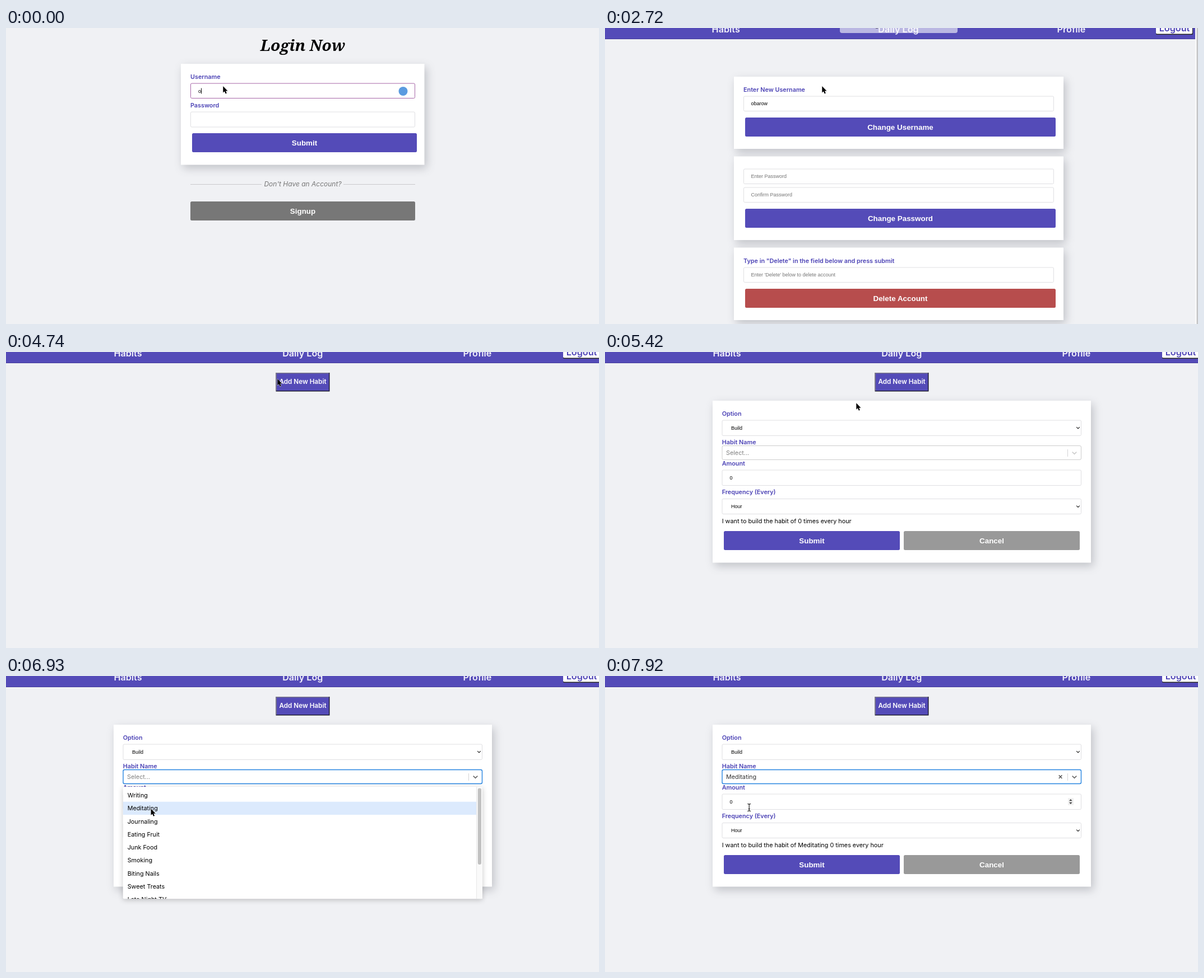
Recreate the animation shown at these times as an HTML page. Size 1058 by 529 pixels, loop 8000 ms.

```html
<!DOCTYPE html>
<html lang="en">
<head>
<meta charset="utf-8">
<title>Habit tracker demo</title>
<style>
html, body { margin: 0; width: 100%; height: 100%; overflow: hidden; background: #f0f1f4; }
svg { display: block; width: 1058px; height: 529px; }
text { font-family: Inter, "Noto Sans", sans-serif; font-size: 10.8px; white-space: pre; }
.title { font: italic 700 28px "Noto Serif", serif; }
.label { font-weight: 600; fill: #4b42b5; }
.nav { font-weight: 600; font-size: 16.2px; fill: #f4f3fb; }
.logout { font-weight: 600; font-size: 16.2px; fill: #4b42b5; }
.add { font-weight: 600; font-size: 11.7px; fill: #fff; }
.ask { font-style: italic; font-size: 12px; fill: #777; }
.input { font-family: "Liberation Sans", Arial, sans-serif; font-size: 9px; }
.hint { fill: #757575; }
.btn { font: 700 13.4px "Liberation Sans", Arial, sans-serif; fill: #fff; }
.grey { fill: #808080; }
.mid { text-anchor: middle; }
.card { filter: drop-shadow(4px 6px 8px rgba(40, 45, 60, .24)); }
.menu { filter: drop-shadow(0 2px 5px rgba(0, 0, 0, .22)); }
</style>
</head>
<body>
<svg id="stage" viewBox="0 0 1058 529"></svg>
<script>
const NS = 'http://www.w3.org/2000/svg';
const stage = document.getElementById('stage');
const PURPLE = '#544bb8', LINE = '#dfdfe2', PINK = '#a766a8', BLUE = '#2684e0';
const USER = 'obarow', LOOP = 8000;

function add(parent, tag, attrs, content) {
  const el = document.createElementNS(NS, tag);
  for (const k in attrs) el.setAttribute(k, attrs[k]);
  if (content !== undefined) el.textContent = content;
  parent.appendChild(el);
  return el;
}
const group = (p, attrs = {}) => add(p, 'g', attrs);
const box = (p, x, y, r, b, fill, more = {}) =>
  add(p, 'rect', { x, y, width: r - x, height: b - y, fill, ...more });
const line = (p, d, stroke, width = 1, more = {}) =>
  add(p, 'path', { d, stroke, 'stroke-width': width, fill: 'none', ...more });
const text = (p, x, y, cls, s) => add(p, 'text', { x, y, class: cls }, s);
const field = (p, x, y, r, b) =>
  box(p, x + .5, y + .5, r - .5, b - .5, '#fff', { stroke: LINE, rx: 2 });
const card = (p, x, y, r, b) => box(p, x, y, r, b, '#fff', { class: 'card' });
const show = (el, on) => el.setAttribute('visibility', on ? 'inherit' : 'hidden');

function button(p, x, y, r, b, fill, s) {
  const el = box(p, x, y, r, b, fill, { rx: 2.5 });
  text(p, (x + r) / 2, (y + b) / 2 + 4.7, 'btn mid', s);
  return el;
}

function navBar(p, right, habits, log, profile, out) {
  box(p, 0, 0, right, 20, PURPLE);
  box(p, 0, 19, right, 20, '#453d9c');
  text(p, habits, 7.6, 'nav mid', 'Habits');
  text(p, log, 7.6, 'nav mid', 'Daily Log');
  text(p, profile, 7.6, 'nav mid', 'Profile');
  box(p, out, -12, out + 66, 12, '#222', { rx: 2 });
  box(p, out, -12, out + 65, 10.6, '#fff', { rx: 2 });
  text(p, out + 33, 5.8, 'logout mid', 'Logout');
}

function dropArrow(p, x, y, colour, size, width) {
  return line(p, `M${x - size} ${y - size / 2}l${size} ${size}l${size} ${-size}`, colour, width);
}

// Login
const login = group(stage);
text(login, 529.5, 40.5, 'title mid', 'Login Now');
card(login, 312, 64, 746.5, 244.5);
text(login, 329, 91, 'label', 'Username');
const userField = field(login, 329, 98.5, 730, 126);
text(login, 329, 142, 'label', 'Password');
const passField = field(login, 329, 149.5, 730, 177.5);
const userText = text(login, 343, 115.5, 'input', '');
const passText = text(login, 343, 166.5, 'input', '');
const caret = box(login, 0, 0, 1, 10, '#111');
const badge = add(login, 'circle', { cx: 708.5, r: 8, fill: '#5b9be0' });
const submit = button(login, 332, 188, 733, 222, PURPLE, 'Submit');
line(login, 'M329 279.5H456M602 279.5H730', '#c9c9cc');
text(login, 529.5, 283.3, 'ask mid', "Don't Have an Account?");
button(login, 329, 310, 730, 344, '#777', 'Signup');

// Profile
const profile = group(stage);
navBar(profile, 1053, 215.7, 523.5, 832, 983);
const toast = group(profile);
box(toast, 419, -12, 629, 9, '#fff', { rx: 4, opacity: .6 });
add(toast, 'ellipse', { cx: 485, cy: -1, rx: 3, ry: 1.8, fill: '#333' });
box(profile, 1053, 0, 1058, 529, '#fafafa');
box(profile, 1055.5, 0, 1058, 529, '#c4c4c6');
card(profile, 230, 87, 818, 216);
text(profile, 247, 114, 'label', 'Enter New Username');
field(profile, 247, 121.5, 801, 149);
text(profile, 260.5, 138, 'input', USER);
button(profile, 250, 160, 804, 194, PURPLE, 'Change Username');
card(profile, 230, 229.5, 818, 379);
field(profile, 247, 251.5, 801, 279);
text(profile, 260.5, 268.3, 'input hint', 'Enter Password');
field(profile, 247, 284.5, 801, 312);
text(profile, 260.5, 301.3, 'input hint', 'Confirm Password');
button(profile, 250, 323, 804, 357, PURPLE, 'Change Password');
card(profile, 230, 392.5, 818, 522);
text(profile, 247, 419.7, 'label', 'Type in "Delete" in the field below and press submit');
field(profile, 247, 427.5, 801, 455);
text(profile, 260.5, 444.2, 'input hint', "Enter 'Delete' below to delete account");
button(profile, 250, 466, 804, 500, '#b74d4d', 'Delete Account');

// Habits
const habits = group(stage);
navBar(habits, 1058, 217.5, 529.3, 841, 994);
box(habits, 481.5, 37, 577.5, 70.5, '#1d1b33');
box(habits, 481.5, 37, 576, 69, '#77758c');
box(habits, 483, 38.5, 576, 69, PURPLE);
text(habits, 529.5, 57.2, 'add mid', 'Add New Habit');

const form = group(habits);
card(form, 192, 87, 867, 376.5);
text(form, 208.7, 114, 'label', 'Option');
field(form, 208.5, 121.5, 850, 150);
text(form, 225, 138.5, 'input', 'Build');
dropArrow(form, 844, 135.5, '#222', 2.8, 1.2);
text(form, 208.7, 165, 'label', 'Habit Name');
const picker = box(form, 209, 167.5, 849.5, 192.5, '#fff', { rx: 2.5 });
const picked = text(form, 216, 184.4, '', '');
line(form, 'M825.5 174V187', '#d4d4d6');
const pickArrow = dropArrow(form, 837.5, 180.5, '#ccc', 3.8, 1.5);
const clear = line(form, 'M809.8 177.3l5.6 5.8M815.4 177.3l-5.6 5.8', '#555', 1.5);
text(form, 208.7, 203.4, 'label', 'Amount');
field(form, 208.5, 210.5, 850, 239);
text(form, 222.5, 227.7, 'input', '0');
const spinner = group(form);
box(spinner, 826, 218, 836, 231, '#f1f1f1');
add(spinner, 'path', { d: 'M828 223.3l2.8-3.2l2.8 3.2zM828 225.7l2.8 3.2l2.8-3.2z', fill: '#444' });
text(form, 208.7, 254.4, 'label', 'Frequency (Every)');
field(form, 208.5, 262, 850, 290);
text(form, 225, 279, 'input', 'Hour');
dropArrow(form, 844, 276, '#222', 2.8, 1.2);
const summary = text(form, 208.7, 306, '', '');
button(form, 212, 320, 526, 354, PURPLE, 'Submit');
button(form, 533, 320, 847, 354, '#999', 'Cancel');

// Option list
const ROW = 23.3, TOP = 201.4;
const menu = group(form);
box(menu, 208.7, 198, 850, 398.3, '#fff', { rx: 2.5, class: 'menu' });
const clip = add(menu, 'clipPath', { id: 'list' });
box(clip, 208.7, 198, 850, 398.3, '#000');
const list = group(menu, { 'clip-path': 'url(#list)' });
const mark = box(list, 208.7, 0, 839, ROW, '#dceafd');
['Writing', 'Meditating', 'Journaling', 'Eating Fruit', 'Junk Food', 'Smoking',
  'Biting Nails', 'Sweet Treats', 'Late Night TV'].forEach((name, i) =>
  text(list, 216.7, TOP + ROW * (i + .5) + 3.9, '', name));
box(list, 839, 198, 850, 398.3, '#fafafa');
line(list, 'M839.5 198V398', '#e8e8e8');
box(list, 841.8, 200.5, 848, 337, '#c1c1c1', { rx: 3 });

// Pointers
const arrow = add(stage, 'path', {
  d: 'M0 0V11.6L2.6 9.2L4.5 13.5L6.5 12.6L4.7 8.5H8.2Z',
  fill: '#000', stroke: '#fff', 'stroke-width': 1, 'paint-order': 'stroke'
});
const beam = line(stage, 'M-3 -6.5Q0 -6.5 0 -5V5Q0 6.5 -3 6.5M3 -6.5Q0 -6.5 0 -5M0 5Q0 6.5 3 6.5M-1.5 2.5H1.5',
  '#222', 1.2, { transform: 'translate(257.2 235)' });

// Pointer moves: first step, last step, number of steps, end point
const MOVES = [
  [3350, 4070, 10, 241, 11], [4420, 4740, 5, 484.3, 48], [4820, 4980, 3, 518, 62],
  [5240, 5920, 10, 346, 134], [6000, 6180, 3, 264.2, 187], [6350, 6440, 2, 264.2, 185.3],
  [6680, 7090, 6, 257, 252], [7170, 7250, 2, 257, 246], [7340, 7340, 1, 257, 238]
];
const TYPED = [0, 80, 230, 310, 390, 470];
const DOTS = [1520, 1670, 1670, 1850, 1940];
const count = (times, t) => times.filter(s => s <= t).length;

function pointer(t) {
  let x = 387.3, y = 104;
  for (const [from, to, n, ex, ey] of MOVES) {
    if (t < from) break;
    const step = to > from ? Math.min(n, Math.floor((t - from) / (to - from) * (n - 1) + 1e-6) + 1) : n;
    const p = step / n, e = p * (2 - p) * .5 + p * .5;
    x += (ex - x) * e;
    y += (ey - y) * e;
  }
  return [x, y];
}

function drawLogin(t) {
  const inUser = t < 830, inPass = !inUser && t < 2120;
  userText.textContent = USER.slice(0, count(TYPED, t));
  passText.textContent = '•'.repeat(count(DOTS, t));
  userField.setAttribute('stroke', inUser ? PINK : LINE);
  passField.setAttribute('stroke', inPass ? PINK : LINE);
  submit.setAttribute('stroke', inUser || inPass ? 'none' : PINK);
  show(badge, inUser || inPass);
  badge.setAttribute('cy', inUser ? 113 : 164);
  show(caret, inUser || inPass && (t < 1340 || t >= 1520));
  const active = inUser ? userText : passText;
  caret.setAttribute('x', 343 + active.getComputedTextLength());
  caret.setAttribute('y', inUser ? 107.5 : 158.5);
}

function drawForm(t, y) {
  const open = t >= 6590 && t < 7680, focus = t >= 6590, chosen = t >= 7680;
  picker.setAttribute('stroke', focus ? BLUE : '#ccc');
  picker.setAttribute('stroke-width', focus ? 1.4 : 1);
  pickArrow.setAttribute('stroke', focus ? '#666' : '#ccc');
  picked.textContent = chosen ? 'Meditating' : 'Select...';
  picked.setAttribute('fill', chosen ? '#333' : '#808080');
  summary.textContent = `I want to build the habit of ${chosen ? 'Meditating ' : ''}0 times every hour`;
  show(clear, chosen);
  show(spinner, chosen);
  show(menu, open);
  // The highlight lags while the pointer rests on the row edge.
  const row = t >= 7090 && t < 7340 ? 2 : Math.max(0, Math.floor((y - TOP) / ROW));
  mark.setAttribute('y', TOP + ROW * row);
  mark.setAttribute('fill', t >= 7600 ? '#b2d4ff' : '#dceafd');
}

function draw(t) {
  const [x, y] = pointer(t);
  show(login, t < 2720);
  show(profile, t >= 2720 && t < 4160);
  show(habits, t >= 4160);
  show(toast, t < 2810);
  show(form, t >= 5160);
  if (t < 2720) drawLogin(t);
  drawForm(t, y);
  show(arrow, t < 7680);
  show(beam, t >= 7680);
  arrow.setAttribute('transform', `translate(${x} ${y})`);
}

const start = performance.now();
function tick() {
  draw((performance.now() - start) % LOOP);
  requestAnimationFrame(tick);
}
tick();
</script>
</body>
</html>
```
